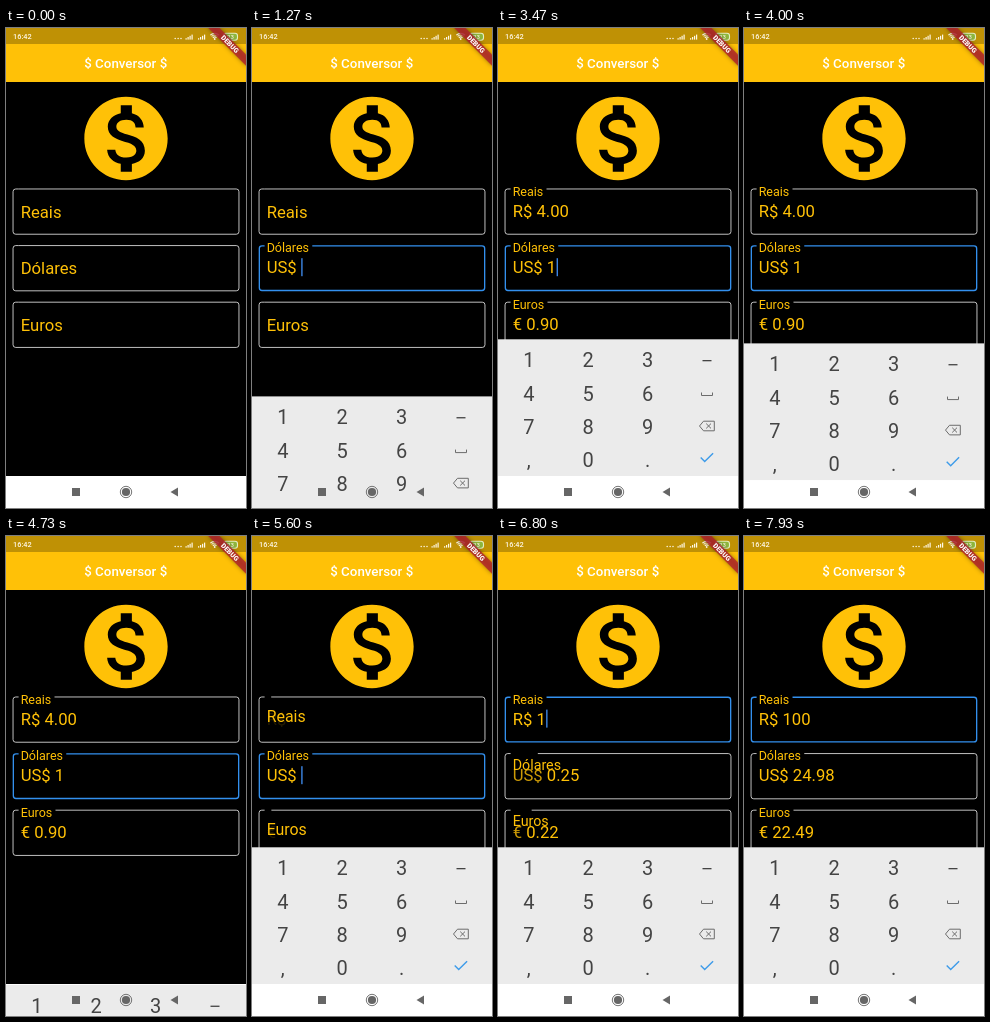
An HTML page with a canvas for the animation above (8 s loop, 240 by 480 pixels).

```html
<!DOCTYPE html>
<html lang="pt">
<head>
<meta charset="utf-8">
<style>
html, body { margin: 0; width: 240px; height: 480px; overflow: hidden; background: #000; }
canvas { display: block; }
</style>
</head>
<body>
<canvas id="stage" width="240" height="480"></canvas>
<script>
const LOOP = 8000, AMBER = '#ffc107', BLUE = '#3390ee';
const g = document.getElementById('stage').getContext('2d');

const fields = [
  { name: 'Reais', prefix: 'R$ ', y: 160.6, floats: [[2430, 1], [5494, 0], [6200, 1]], focus: [[6200, 1]] },
  { name: 'Dólares', prefix: 'US$ ', y: 217.2, floats: [[930, 1], [6200, 0], [6725, 1]], focus: [[930, 1], [6200, 0]] },
  { name: 'Euros', prefix: '€ ', y: 273.8, floats: [[2430, 1], [5494, 0], [6725, 1]], focus: [] }
];
const entries = [
  [0, '', '', ''], [2430, '4.00', '1', '0.90'], [5494, '', '', ''],
  [6725, '1', '0.25', '0.22'], [7130, '10', '2.50', '2.25'], [7430, '100', '24.98', '22.49']
];
const cursorOn = [[1000, 1500], [2000, 2670], [3130, 3700], [4230, 4710], [5260, 5790], [6200, 7920]];
// start, end, column, row
const presses = [[2330, 2440, 0, 0], [5330, 5480, 3, 2], [6590, 6725, 0, 0], [7000, 7130, 1, 3], [7320, 7430, 1, 3]];
const keys = ['123', '456', '789', ',0.'];
const coin = new Path2D('M12 2C6.48 2 2 6.48 2 12s4.48 10 10 10 10-4.48 10-10S17.52 2 12 2zm1.41 16.09V20h-2.67v-1.93c-1.71-.36-3.16-1.46-3.27-3.4h1.96c.1 1.05.82 1.87 2.65 1.87 1.96 0 2.4-.98 2.4-1.59 0-.83-.44-1.61-2.67-2.14-2.48-.6-4.18-1.62-4.18-3.67 0-1.72 1.39-2.84 3.11-3.21V4h2.67v1.95c1.86.45 2.79 1.86 2.85 3.39H14.3c-.05-1.11-.64-1.87-2.22-1.87-1.5 0-2.4.68-2.4 1.64 0 .84.65 1.39 2.67 1.91s4.18 1.39 4.18 3.91c-.02 1.83-1.38 2.83-3.12 3.16z');

const clamp = x => Math.min(1, Math.max(0, x));
const smooth = x => x * x * (3 - 2 * x);
const within = (t, [from, to]) => t >= from && t < to;

// cubic-bezier(.4, 0, .2, 1)
function ease(x) {
  let lo = 0, hi = 1, s = .5;
  for (let i = 0; i < 16; i++) {
    const bx = 1.2 * s * (1 - s) ** 2 + .6 * s * s * (1 - s) + s ** 3;
    if (bx < x) lo = s; else hi = s;
    s = (lo + hi) / 2;
  }
  return smooth(s);
}

// Value of a switch that takes 200 ms to change over
function level(changes, t) {
  let v = 0;
  for (const [at, to] of changes) if (t >= at) v += (to - v) * ease(clamp((t - at) / 200));
  return v;
}

function font(size, weight = 400) { g.font = `${weight} ${size}px Roboto, sans-serif`; }

function text(str, x, y, size, color, weight, align = 'left') {
  font(size, weight);
  g.fillStyle = color;
  g.textAlign = align;
  g.fillText(str, x, y);
}

function rect(x, y, w, h, color) {
  g.fillStyle = color;
  g.fillRect(x, y, w, h);
}

function disc(x, y, r, color) {
  g.fillStyle = color;
  g.beginPath();
  g.arc(x, y, r, 0, 7);
  g.fill();
}

function shape(points, color, width, close) {
  g.beginPath();
  points.forEach(([x, y]) => g.lineTo(x, y));
  if (close) g.closePath();
  if (width) {
    g.strokeStyle = color;
    g.lineWidth = width;
    g.stroke();
  } else {
    g.fillStyle = color;
    g.fill();
  }
}

function status() {
  const ink = '#fff8e6';
  text('16:42', 7, 11.4, 7.4, ink, 500);
  for (let i = 0; i < 3; i++) disc(169.2 + i * 2.9, 10.4, .75, ink);
  for (const x of [179.5, 192]) {
    for (let i = 0; i < 4; i++) rect(x + i * 2, 10.2 - i * 1.2, 1.2, 1.4 + i * 1.2, ink);
  }
  g.strokeStyle = ink;
  g.lineWidth = 1.1;
  for (const r of [2.6, 4.4, 6.2]) {
    g.beginPath();
    g.arc(208.7, 11.6, r, -2.35, -.79);
    g.stroke();
  }
  disc(208.7, 11, .9, ink);
  g.beginPath();
  g.roundRect(217.5, 5.2, 14, 7, 2.5);
  g.fillStyle = '#8db63c';
  g.fill();
  g.strokeStyle = '#e4efc4';
  g.stroke();
  text('23', 224.5, 11, 6, ink, 500, 'center');
}

function banner() {
  g.save();
  g.translate(240, 0);
  g.rotate(Math.PI / 4);
  g.shadowColor = 'rgba(0,0,0,.5)';
  g.shadowBlur = 4;
  rect(-26.7, 18.7, 53.4, 8, 'rgba(178,30,46,.78)');
  g.shadowBlur = 0;
  text('DEBUG', 0, 25.1, 6.8, '#fff', 900, 'center');
  g.restore();
}

function header() {
  rect(0, 0, 240, 54, AMBER);
  rect(0, 0, 240, 16, '#bf9105');
  text('$ Conversor $', 119.7, 40.4, 13.33, '#fff', 500, 'center');
  status();
  banner();
  g.save();
  g.translate(70, 60.5);
  g.scale(100 / 24, 100 / 24);
  g.fillStyle = AMBER;
  g.fill(coin);
  g.restore();
}

// The line lies inside the field's edge
function outline(top, gap, color, width, alpha) {
  const inset = width / 2, q = 2.67;
  const l = 6.67 + inset, r = 233.33 - inset, y = top + inset, b = top + 46 - inset;
  g.globalAlpha = alpha;
  g.strokeStyle = color;
  g.lineWidth = width;
  g.beginPath();
  g.moveTo(12.6 + gap, y);
  g.arcTo(r, y, r, b, q);
  g.arcTo(r, b, l, b, q);
  g.arcTo(l, b, l, y, q);
  g.arcTo(l, y, r, y, q);
  g.lineTo(12.6, y);
  g.stroke();
  g.globalAlpha = 1;
}

function field(f, value, t) {
  const up = level(f.floats, t), focus = level(f.focus, t), base = f.y + 28.2, x = 14.67;
  font(12.5);
  const gap = (g.measureText(f.name).width + 5.3) * up;
  outline(f.y, gap, '#fff', .75, 1 - focus);
  outline(f.y, gap, BLUE, 1.33, focus);

  g.globalAlpha = smooth(clamp(1.25 * up));
  text(f.prefix, x, base, 16.67, AMBER);
  g.globalAlpha = 1;
  const start = x + g.measureText(f.prefix).width;
  text(value, start, base, 16.67, AMBER);
  const end = start + g.measureText(value).width;
  text(f.name, x, f.y + 29.2 - 22.1 * up, 16.67 - 4.17 * up, AMBER);
  if (focus > .5 && cursorOn.some(span => within(t, span))) {
    rect(end + .4, f.y + 13, 1.33, 18, '#3f8cf0');
  }
}

// Distance the keyboard is pushed down
function keyboardShift(t) {
  const out = x => 1 - (1 - clamp(x)) ** 2;
  if (t < 3870) return 169 * (1 - out((t - 1070) / 480));
  if (t < 4690) return 169 * clamp((t - 3900) / 650) ** 2;
  return 169 * (1 - out((t - 4690) / 420));
}

function keyboard(t) {
  const shift = keyboardShift(t), ink = '#444', soft = '#6c6c6c';
  if (shift >= 169) return;
  g.save();
  g.translate(0, shift);
  rect(0, 311.3, 240, 136.7, '#ebebeb');
  for (const [from, to, col, row] of presses) {
    if (within(t, [from, to])) rect(1 + col * 59.6, 315 + row * 33.2, 59, 33, '#d2d2d2');
  }
  keys.forEach((row, r) => [...row].forEach((key, c) =>
    text(key, 30.8 + c * 59.4, 339.4 + r * 33.1, 20, ink, 400, 'center')));
  rect(204.5, 332, 9, 1.3, ink);
  shape([[203.5, 364.5], [203.5, 367.5], [214.5, 367.5], [214.5, 364.5]], soft, 1);
  shape([[201.5, 398], [205.5, 393.2], [216.3, 393.2], [216.3, 402.8], [205.5, 402.8]], soft, 1, true);
  shape([[208.2, 395.6], [213, 400.4]], soft, 1);
  shape([[213, 395.6], [208.2, 400.4]], soft, 1);
  shape([[202.7, 429.6], [206.7, 433.6], [215.1, 425.2]], '#3d9be9', 1.4);
  g.restore();
}

function navigation(t) {
  const ripple = clamp((t - 3500) / 60) * clamp((3730 - t) / 120);
  if (ripple) disc(168, 464, 12, `rgba(0,0,0,${.12 * ripple})`);
  const ink = '#666';
  rect(66, 460, 8, 8, ink);
  disc(120, 464, 4.1, ink);
  g.strokeStyle = ink;
  g.lineWidth = .9;
  g.beginPath();
  g.arc(120, 464, 5.7, 0, 7);
  g.stroke();
  shape([[164.5, 464], [172, 459.6], [172, 468.4]], ink);
}

function draw(now) {
  const t = now % LOOP;
  rect(0, 0, 240, 480, '#000');
  header();
  const values = entries.filter(([at]) => t >= at).pop();
  fields.forEach((f, i) => field(f, values[i + 1], t));
  rect(0, 448, 240, 32, '#fff');
  keyboard(t);
  navigation(t);
}

const begin = performance.now();
function tick() {
  draw(performance.now() - begin);
  requestAnimationFrame(tick);
}
tick();
</script>
</body>
</html>
```
